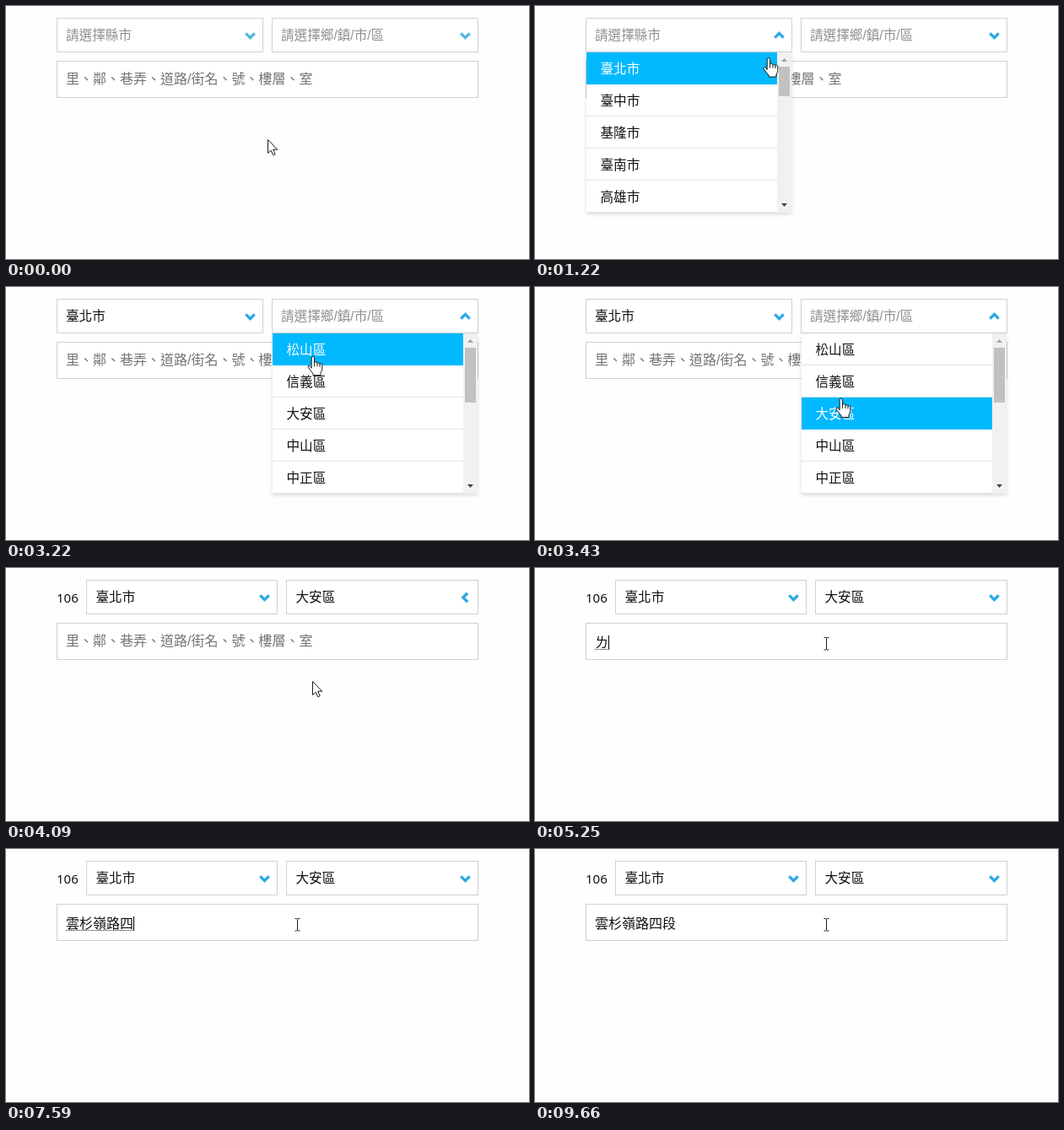
Animation of 620x300 px, one loop 9.73 s. Source, as an HTML page:

```html
<!DOCTYPE html>
<html lang="zh-Hant-TW">
<head>
<meta charset="utf-8">
<title>地址表單</title>
<style>
html, body { margin: 0; width: 100%; height: 100%; overflow: hidden; background: #fefefe; }
svg { display: block; width: 100vw; height: 100vh; }
text { font: 350 15.6px "Liberation Sans", "Noto Sans CJK TC", "Noto Sans CJK", sans-serif; fill: #111; }
.field { font-size: 16px; }
.hint { fill: #909090; }
.field.hint { fill: #747474; }
.zip { font: 15px "Noto Sans", "Open Sans", sans-serif; }
.box { fill: #fff; stroke: #d0d0d6; }
.chevron { fill: none; stroke-width: 3.4; }
.menu { filter: drop-shadow(0 2px 2px rgba(0, 0, 0, .14)); }
.cursor { fill: #fff; stroke: #1a1a1a; stroke-linejoin: round; }
</style>
</head>
<body>
<svg id="stage" viewBox="0 0 620 300"></svg>
<script>
const LOOP = 9730;
const OPEN_CITY = 680, PICK_CITY = 1690, OPEN_AREA = 2600, PICK_AREA = 3960, FOCUS = 4730, TYPE = 5250, COMMIT = 9130;
const ROW = 38, MENU_TOP = 55, TEXT_X = 71, GLYPH = 16;

// time, x, y
const PATH = [
  [0, 310, 158], [70, 310, 158], [280, 289, 32], [820, 289, 34], [1220, 277, 61.5], [1490, 272, 67],
  [2040, 272, 67], [2390, 360, 44], [2650, 360, 45], [3010, 364, 78], [3080, 364, 79], [3220, 364, 82],
  [3430, 363, 132], [3690, 363, 132], [3760, 363, 134], [4160, 363, 134], [4590, 345, 89]
];

const TYPING = [
  [0, ''], [5250, 'ㄌ'], [5390, 'ㄌㄨ'], [5520, 'ㄌㄨㄛ'], [5650, '螺'], [5850, '螺ㄙ'], [5980, '螺絲'],
  [6250, '螺絲ㄌ'], [6380, '螺絲ㄌㄧ'], [6580, '雲杉嶺'], [6860, '雲杉嶺ㄌ'], [7060, '雲杉嶺ㄌㄨ'],
  [7260, '雲杉嶺路'], [7520, '雲杉嶺路ㄙ'], [7590, '雲杉嶺路四'], [7850, '雲杉嶺路四ㄉ'],
  [7920, '雲杉嶺路四ㄉㄨ'], [8120, '雲杉嶺路四ㄉㄨㄢ'], [8250, '雲杉嶺路四段']
];

const stage = document.getElementById('stage');

function el(tag, attrs, parent = stage, text = '') {
  const node = document.createElementNS('http://www.w3.org/2000/svg', tag);
  for (const key in attrs) node.setAttribute(key, attrs[key]);
  node.textContent = text;
  parent.append(node);
  return node;
}

function set(node, attrs) {
  for (const key in attrs) node.setAttribute(key, attrs[key]);
}

function show(node, visible) {
  node.style.display = visible ? '' : 'none';
}

function makeSelect() {
  return {
    box: el('rect', { class: 'box', y: 14.5, height: 40 }),
    label: el('text', { y: 40 }),
    chevron: el('path', { class: 'chevron', d: 'M-5.2-2.6 0 2.6 5.2-2.6' })
  };
}

function drawSelect(select, left, right, textX, label, chosen, angle, color) {
  set(select.box, { x: left + .5, width: right - left - 1 });
  set(select.label, { x: textX, class: chosen ? '' : 'hint' });
  select.label.textContent = label;
  set(select.chevron, { transform: `translate(${right - 15.5} 35) rotate(${angle})`, stroke: color });
}

function makeMenu(x, names, thumbHeight) {
  const group = el('g', { class: 'menu', transform: `translate(${x} ${MENU_TOP})` });
  el('rect', { width: 243, height: 190, fill: '#fff' }, group);
  const rows = names.map((name, i) => {
    const y = i * ROW;
    el('rect', { y: y + ROW - 1, width: 226, height: 1, fill: '#e4e4e4' }, group);
    const back = el('rect', { y, width: 226, height: ROW, fill: '#00b9ff' }, group);
    const text = el('text', { x: 16.5, y: y + 25 }, group, name);
    return { back, text };
  });
  el('rect', { x: 226, width: 17, height: 190, fill: '#f1f1f1' }, group);
  el('rect', { x: 228, y: 17, width: 13, height: thumbHeight, fill: '#c1c1c1' }, group);
  el('path', { d: 'M231 11l3.5-4 3.5 4z', fill: '#a3a3a3' }, group);
  el('path', { d: 'M231 179l3.5 4 3.5-4z', fill: '#454545' }, group);
  return { group, rows };
}

function drawMenu(menu, open, pointerY) {
  show(menu.group, open);
  const hovered = Math.floor((pointerY - MENU_TOP) / ROW);
  menu.rows.forEach(({ back, text }, i) => {
    show(back, i === hovered);
    text.style.fill = i === hovered ? '#fff' : '';
  });
}

const zip = el('text', { class: 'zip', x: 60, y: 41 }, stage, '106');
const city = makeSelect();
const area = makeSelect();
el('rect', { class: 'box', x: 60.5, y: 65.5, width: 499, height: 43 });
const hint = el('text', { class: 'field hint', x: TEXT_X, y: 92 }, stage, '里、鄰、巷弄、道路/街名、號、樓層、室');
const typed = el('text', { class: 'field', x: TEXT_X, y: 94 });
const underline = el('path', { stroke: '#222', 'stroke-dasharray': '1 1' });
const caret = el('rect', { y: 80, width: 1, height: 17 });
const cityMenu = makeMenu(61, ['臺北市', '臺中市', '基隆市', '臺南市', '高雄市'], 35);
const areaMenu = makeMenu(316, ['松山區', '信義區', '大安區', '中山區', '中正區'], 65);

const cursors = {
  arrow: 'M.5.5V16.5L4.2 13.2 6.8 18.8 9.2 17.7 6.7 12.2H11.7z',
  hand: 'M-1.8 14V1.8a1.7 1.7 0 0 1 3.4 0V8a1.7 1.7 0 0 1 3.4.5V9a1.5 1.5 0 0 1 3 .5V10a1.4 1.4 0 0 1 2.8.4V15'
    + 'q0 2-1.8 4.5V22.5H0V20.5L-5.6 13.5q-1-2 .6-2.6q1.2-.3 3.2 3.1zM1.6 8V12M5 9V12M8 10V12.5',
  beam: 'M-2.5-6.5H-.5L.5-6 1.5-6.5H3.5M.5-6V7.5M-2.5 8H-.5L.5 7.5 1.5 8H3.5'
};
for (const kind in cursors) cursors[kind] = el('path', { class: 'cursor', d: cursors[kind] });
cursors.beam.style.fill = 'none';

function pointerAt(t) {
  const next = PATH.findIndex(step => step[0] > t);
  if (next < 0) return PATH[PATH.length - 1].slice(1);
  const [t0, x0, y0] = PATH[next - 1], [t1, x1, y1] = PATH[next];
  const p = (t - t0) / (t1 - t0);
  return [x0 + (x1 - x0) * p, y0 + (y1 - y0) * p];
}

function turn(t, start) {
  const p = Math.min(1, Math.max(0, (t - start) / 260));
  return 180 * p * p * (3 - 2 * p);
}

function render(t) {
  const [x, y] = pointerAt(t);
  const cityPicked = t >= PICK_CITY, areaPicked = t >= PICK_AREA;
  const color = t < OPEN_CITY ? '#55b6de' : '#2ba8e6';

  show(zip, areaPicked);
  drawSelect(city, areaPicked ? 95 : 60, areaPicked ? 322 : 305, areaPicked ? 106.5 : TEXT_X,
    cityPicked ? '臺北市' : '請選擇縣市', cityPicked, turn(t, OPEN_CITY) - turn(t, PICK_CITY), color);
  drawSelect(area, areaPicked ? 332 : 315, 560, areaPicked ? 343.5 : 326,
    areaPicked ? '大安區' : '請選擇鄉/鎮/市/區', areaPicked, turn(t, OPEN_AREA) - turn(t, PICK_AREA), color);
  drawMenu(cityMenu, t >= OPEN_CITY && !cityPicked, y);
  drawMenu(areaMenu, t >= OPEN_AREA && !areaPicked, y);

  const value = TYPING.filter(step => step[0] <= t).pop()[1];
  const end = TEXT_X + GLYPH * value.length;
  typed.textContent = value;
  show(hint, t < TYPE);
  show(underline, t >= TYPE && t < COMMIT);
  set(underline, { d: `M${TEXT_X} 96.5H${end}` });
  set(caret, { x: end });
  show(caret, t >= FOCUS && t < 8860 || t >= COMMIT && t < 9660);

  const kind = t < 210 || areaPicked && y >= 109 ? 'arrow' : areaPicked ? 'beam' : 'hand';
  for (const name in cursors) show(cursors[name], name === kind);
  set(cursors[kind], { transform: `translate(${x} ${y})` });
}

const start = performance.now();
function tick() {
  render((performance.now() - start) % LOOP);
  requestAnimationFrame(tick);
}
tick();
</script>
</body>
</html>
```
